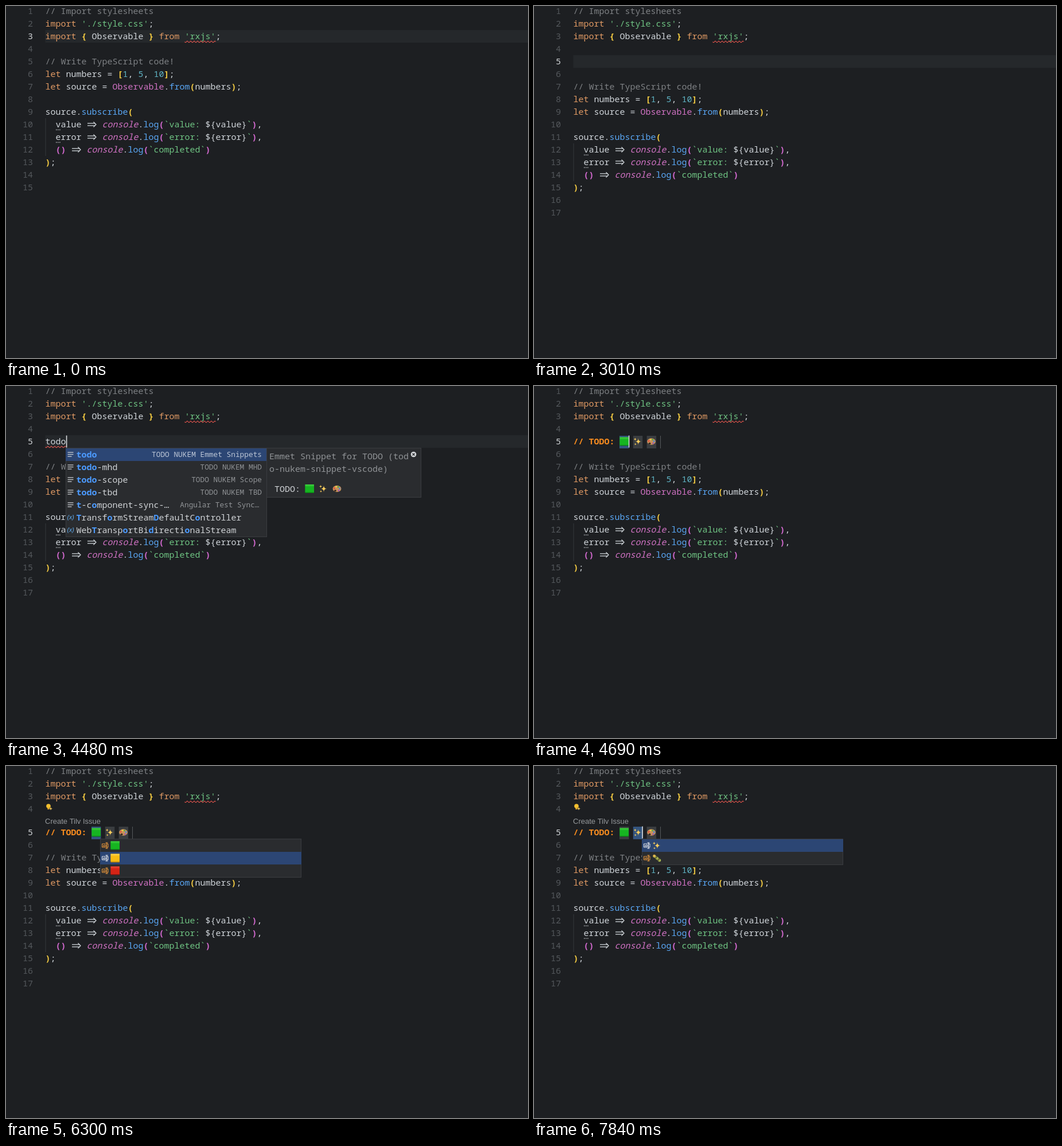
These frames come from a looping animation (910x615 px, 8 s). An HTML page with a canvas:

```html
<!DOCTYPE html>
<html lang="en">
<head>
<meta charset="utf-8">
<title>Snippet completion in an editor</title>
<style>
html, body { margin: 0; width: 100%; height: 100%; overflow: hidden; background: #1d1f22; }
canvas { display: block; }
</style>
</head>
<body>
<canvas id="stage" width="910" height="615"></canvas>
<script>
const ctx = document.getElementById('stage').getContext('2d');
const LOOP = 8000, LEFT = 68.5, CH = 9, ROW = 22, LENS = 19;
const MONO = '"Noto Sans Mono", "DejaVu Sans Mono", monospace';
const SANS = '"Liberation Sans", Arial, sans-serif';
const SELECTED = '#2c4674';
const COLORS = {
  c: '#7e8184', k: '#e09a64', s: '#6fc483', w: '#d0d5da', y: '#f6cd42', n: '#5fb4c5',
  p: '#d172c4', i: '#d172c4', b: '#5aa7f5', m: '#d76bd3', o: '#f68b1f'
};
const STYLES = { i: 'italic', y: '600', m: '600', o: '600' };

// Each segment starts with its colour key; "a" draws the arrow ligature.
const HEAD = [
  'c// Import stylesheets',
  "kimport |s'./style.css'|w;",
  "kimport |y{|w Observable |y}|k from |s'rxjs'|w;"
];
const logLine = name =>
  'w  ' + name + ' |a=>|w |iconsole|w.|blog|m(|s`' + name + ': |w${' + name + '}|s`|m)|w,';
const TAIL = [
  '',
  'c// Write TypeScript code!',
  'klet |wnumbers = |y[|n1|w, |n5|w, |n10|y]|w;',
  'klet |wsource = |pObservable|w.|bfrom|y(|wnumbers|y)|w;',
  '',
  'wsource.|bsubscribe|y(',
  logLine('value'),
  logLine('error'),
  'w  |m()|w |a=>|w |iconsole|w.|blog|m(|s`completed`|m)',
  'y)|w;',
  '', ''
];

const SNIPPETS = [
  ['todo', 'TODO NUKEM Emmet Snippets'],
  ['todo-mhd', 'TODO NUKEM MHD'],
  ['todo-scope', 'TODO NUKEM Scope'],
  ['todo-tbd', 'TODO NUKEM TBD'],
  ['t-component-sync-…', 'Angular Test Sync…']
];
const GLOBALS = ['TransformStreamDefaultController', 'WebTransportBidirectionalStream'];
const EXTRA = ['TransformStream', 'TextDecoder', 'TextDecoderStream', 'WebTransportError', 'toolbar'];

const OFF = [[0, 1400], [1960, 2310], [3010, 3150], [5110, 5600], [6160, 6650], [7210, 7700]];
const TYPED = [3150, 3360, 3780, 4060];
const LISTED = [3220, 3430, 3850, 4130];
const passed = (times, t) => times.filter(x => t >= x).length;

function rect(x, y, w, h, fill) {
  ctx.fillStyle = fill;
  ctx.fillRect(x, y, w, h);
}

function text(str, x, y, fill, size = 15, style = '', family = MONO, align = 'left') {
  ctx.font = `${style} ${size}px ${family}`;
  ctx.fillStyle = fill;
  ctx.textAlign = align;
  ctx.fillText(str, x, y);
}

function disc(x, y, r, fill, ry = r) {
  ctx.fillStyle = fill;
  ctx.beginPath();
  ctx.ellipse(x, y, r, ry, 0, 0, 7);
  ctx.fill();
}

function path(points, color, width = 1.3) {
  ctx.strokeStyle = color;
  ctx.lineWidth = width;
  ctx.beginPath();
  points.forEach(([x, y]) => ctx.lineTo(x, y));
  ctx.stroke();
}

function box(x, y, w, h) {
  rect(x, y, w, h, '#2a2c2f');
  ctx.strokeStyle = '#3a3c40';
  ctx.lineWidth = 1;
  ctx.strokeRect(x + .5, y + .5, w - 1, h - 1);
}

function arrow(x, y) {
  path([[x + 1.5, y - 2], [x + 15, y - 2]], COLORS.w);
  path([[x + 1.5, y + 2], [x + 15, y + 2]], COLORS.w);
  path([[x + 12, y - 4.5], [x + 16.5, y], [x + 12, y + 4.5]], COLORS.w);
}

function squiggle(x, y, w) {
  const wave = [];
  for (let d = 0; d <= w; d += .5) wave.push([x + d, y + 1.2 * Math.sin(d * Math.PI / 3)]);
  path(wave, '#e4544c', 1.1);
}

function codeLine(line, top) {
  let col = 0;
  for (const part of line.split('|')) {
    const key = part[0], str = part.slice(1), x = LEFT + col * CH;
    if (key === 'a') arrow(x, top + 11);
    else if (key) text(str, x, top + 16, COLORS[key], 15, STYLES[key]);
    col += str.length;
  }
}

// Emoji are drawn in a 16 px cell with its top left corner at x, y.
function square(x, y, light, main, dark) {
  rect(x + .5, y + .5, 15.5, 15, dark);
  const shade = ctx.createLinearGradient(0, y, 0, y + 14);
  shade.addColorStop(0, light);
  shade.addColorStop(.35, main);
  shade.addColorStop(1, main);
  rect(x + .5, y + .5, 15.5, 13.5, shade);
}
const green = (x, y) => square(x, y, '#4bd548', '#16b521', '#0b8715');
const yellow = (x, y) => square(x, y, '#ffdc60', '#f6bb12', '#bd860c');
const red = (x, y) => square(x, y, '#ef5240', '#d62416', '#8f160f');

function star(x, y, r) {
  ctx.fillStyle = '#f8cd5c';
  ctx.beginPath();
  ctx.moveTo(x, y - r);
  for (const [dx, dy] of [[r, 0], [0, r], [-r, 0], [0, -r]])
    ctx.quadraticCurveTo(x, y, x + dx, y + dy);
  ctx.fill();
}
function sparkles(x, y) {
  star(x + 9, y + 8, 5.8);
  star(x + 3.5, y + 4, 3);
  star(x + 4, y + 12.5, 2.6);
}

function palette(x, y) {
  disc(x + 8, y + 8, 7.4, '#c99159', 5.8);
  disc(x + 5, y + 11.3, 2, '#33291f', 1.6);
  [['#e24b3e', 3.5, 7], ['#f0c945', 6.5, 4.5], ['#4cae50', 10.2, 4.7], ['#4687dc', 12.6, 7.5], ['#9a56b4', 11, 11]]
    .forEach(([color, dx, dy]) => disc(x + dx, y + dy, 1.5, color));
}

function caterpillar(x, y) {
  for (let n = 4; n >= 0; n--)
    disc(x + 4 + n * 2.2, y + 4.5 + n * 1.8, 2.5, n % 2 ? '#6c6a35' : '#a9b84f');
  disc(x + 3.5, y + 4, 2.2, '#e0b34c');
}

function snippetIcon(x, y) {
  [[-3.5, 10], [0, 10], [3.5, 7]].forEach(([dy, w]) => path([[x, y + dy], [x + w, y + dy]], '#c9cccf'));
}

function valueIcon(x, y, color) {
  path([[x + 7, y - 3], [x + .5, y - 3], [x + .5, y + 3], [x + 7, y + 3]], color, 1);
  text('ab', x + 1.5, y + 2, color, 5.5, 'bold', SANS);
  path([[x + 8.5, y - 5], [x + 8.5, y + 5]], color, 1.2);
  path([[x + 6.5, y - 5], [x + 10.5, y - 5]], color, 1);
  path([[x + 6.5, y + 5], [x + 10.5, y + 5]], color, 1);
  path([[x + 9, y - 3], [x + 11, y - 3], [x + 11, y + 3], [x + 9, y + 3]], color, 1);
}

function matched(label, query, x, y) {
  let hit = 0;
  [...label].forEach((ch, n) => {
    const same = ch.toLowerCase() === query[hit];
    if (same) hit++;
    text(ch, x + n * CH, y, same ? '#4c9bff' : '#d0d3d6', 15, same ? 'bold' : '');
  });
}

function suggestions(count) {
  const x = Math.round(LEFT + count * CH - .5), y = 108, query = 'todo'.slice(0, count);
  const items = [...SNIPPETS, ...[...GLOBALS, ...(count < 4 ? EXTRA : [])].map(name => [name])];
  box(x, y, 351, items.length * ROW + 2);
  rect(x, y + 1, 351, ROW, SELECTED);
  items.forEach(([label, detail], n) => {
    const mid = y + 11.5 + n * ROW;
    if (detail) snippetIcon(x + 3.5, mid);
    else text('(x)', x + 2.5, mid + 3.5, '#62b0f5', 10.5, 'italic', SANS);
    matched(label, query, x + 18.5, mid + 5);
    if (detail) text(detail, x + (n === 4 ? 337.5 : 342), mid + 4.5, n ? '#909396' : '#bcc6d6', 12.8, '', MONO, 'right');
  });

  const px = x + 351;
  box(px - 1, y, 270, 87);
  text('Emmet Snippet for TODO (tod', px + 4, y + 19.5, '#909396');
  text('o-nukem-snippet-vscode)', px + 4, y + 41.5, '#909396');
  text('TODO:', px + 13, y + 76.5, '#d0d3d6');
  green(px + 66, y + 63.5);
  sparkles(px + 90, y + 63.5);
  palette(px + 114, y + 63.5);
  const cx = px + 255.5, cy = y + 11.5;
  disc(cx, cy, 4.8, '#d3d6d9');
  path([[cx - 2, cy - 2], [cx + 2, cy + 2]], '#2a2c2f');
  path([[cx + 2, cy - 2], [cx - 2, cy + 2]], '#2a2c2f');
}

function choices(x, y, icons, selected) {
  box(x, y, 351, icons.length * ROW + 2);
  icons.forEach((icon, n) => {
    const top = y + 1 + n * ROW;
    if (n === selected) rect(x, top, 351, ROW, SELECTED);
    valueIcon(x + 3, top + 11, n === selected ? '#e8eaed' : '#e8973c');
    icon(x + 18, top + 3);
  });
}

function snippetLine(top, active) {
  text('// TODO:', LEFT, top + 16, COLORS.o, 15, STYLES.o);
  [green, sparkles, palette].forEach((icon, n) => {
    const x = 149 + n * 23.8;
    rect(x, top + 1, 16.5, ROW, n === active ? '#34557f' : '#3a3d40');
    icon(x, top + 3);
  });
  rect(220, top + 1, 1, ROW, '#55585b');
}

function bulb() {
  disc(74, 70, 3.8, '#f5c02f');
  rect(72.3, 73, 3.4, 2.8, '#d9a528');
  star(78, 74.5, 3.5);
}

function draw(t) {
  const added = passed([2310, 2520], t);
  const expanded = t >= 4550, lens = t >= 4900, second = t >= 7840;
  const current = 3 + added;
  const typed = expanded ? 0 : passed(TYPED, t);
  const topOf = n => n * ROW - 24 + (lens && n >= 5 ? LENS : 0);
  const lines = [...HEAD, ...Array(added).fill(''), ...TAIL];
  if (typed) lines[4] = 'w' + 'todo'.slice(0, typed);

  rect(0, 0, 910, 615, '#1d1f22');
  if (!expanded) rect(LEFT, topOf(current), 842, ROW, '#25282b');
  lines.forEach((line, n) => {
    const top = topOf(n + 1);
    text(n + 1, 47, top + 16, n + 1 === current ? '#d0d3d6' : '#54585c', 15, '', MONO, 'right');
    codeLine(line, top);
  });

  const callback = added + 10;
  rect(LEFT, topOf(callback), 1, 3 * ROW, '#35383b');
  for (const n of [callback, callback + 1])
    for (let d = 0; d < 3; d++) rect(87 + d * 3, topOf(n) + 19.5, 1.6, 1.6, '#a5a8ab');
  squiggle(LEFT + 27 * CH, 62.5, 54);
  if (t >= 4480 && !expanded) squiggle(LEFT, 106.5, 36);

  const top = topOf(current);
  let caret = LEFT + (added ? typed : 34) * CH;
  if (expanded) {
    snippetLine(top, second ? 1 : 0);
    caret = second ? 188 : 164.5;
  }
  if (lens) text('Create Tilv Issue', 68, 100.5, '#96999c', 13, '', SANS);
  if (t >= 5250) bulb();
  if (!OFF.some(([from, to]) => t >= from && t < to)) rect(caret + .3, top + .5, 1.6, ROW - 1, '#d9dcdf');

  const listed = passed(LISTED, t);
  if (listed && !expanded) suggestions(listed);
  if (second) choices(188, top + ROW, [sparkles, caterpillar], 0);
  else if (t >= 4830) {
    const selected = t < 6300 ? 0 : t < 6650 ? 1 : t < 7070 ? 2 : t < 7210 ? 1 : 0;
    choices(164, top + ROW, [green, yellow, red], selected);
  }
}

const start = performance.now();
function tick() {
  draw((performance.now() - start) % LOOP);
  requestAnimationFrame(tick);
}
tick();
</script>
</body>
</html>
```
